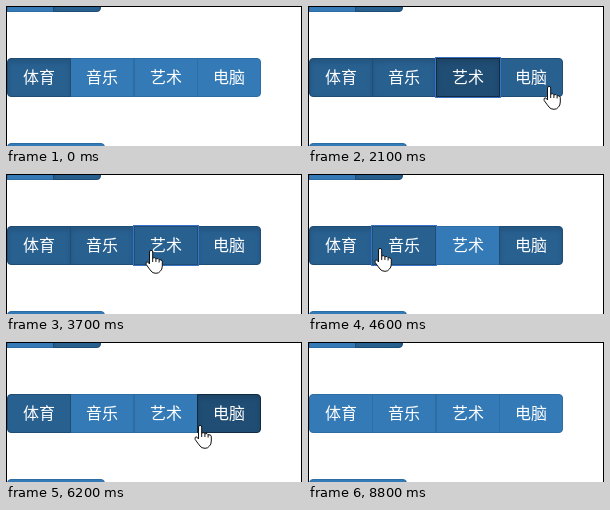
An HTML page for the animation above (9 s loop, 296 by 140 pixels).

```html
<!DOCTYPE html>
<html lang="zh-CN">
<head>
<meta charset="utf-8">
<style>
html, body { margin: 0; width: 296px; height: 140px; overflow: hidden; background: #fff; }
body { position: relative; }
body > * { position: absolute; box-sizing: border-box; }
.btn {
  top: 52px; width: 64px; height: 39px; line-height: 34px;
  background: #337ab7; border: 1px solid #2e6da4; color: #fff;
  font-family: "Noto Sans CJK SC Light", "Noto Sans CJK SC", "Noto Sans CJK", sans-serif;
  font-size: 16px; font-weight: 300; text-align: center; white-space: nowrap;
}
.first { border-radius: 4px 0 0 4px; }
.last { border-radius: 0 4px 4px 0; }
.hover, .focus, .active { background: #286090; border-color: #204d74; z-index: 1; }
.active { box-shadow: inset 0 3px 5px rgba(0, 0, 0, .125); }
.focus { z-index: 2; }
.active.hover, .active.focus { background: #204d74; border-color: #122b40; }
.focus:not(.first) { outline: 1px solid #3a72c6; }
#cursor { left: 0; top: 0; z-index: 3; overflow: visible; }
#cursor path { fill: #fff; stroke: #111; stroke-linejoin: round; }
#frame { inset: 0; z-index: 4; border: solid #000; border-width: 1px 1px 0; }
</style>
</head>
<body>
<div class="btn" style="left:1px;top:-33px;width:47px"></div>
<div class="btn active last" style="left:47px;top:-33px;width:48px"></div>
<div class="btn" style="left:1px;top:137px;width:98px;border-radius:4px"></div>
<svg id="cursor" width="18" height="24">
  <path id="arrow" d="M.5.5V16.5L4.3 13L6.8 18.6L9.3 17.5L6.8 12H12Z"/>
  <g id="hand" transform="translate(-1)">
    <path d="M-1.5 14V2a1.6 1.6 0 0 1 3.2 0V8q2.8-1 3.2.8q2.6-.9 3.2.9q3.2-.4 3.2 2V16q0 3.5-2 5.2Q8 23.3 5 23.3Q1.5 23.3 0 21Q-2 18.5-4.8 14.5Q-5.6 12.3-4 11.8Q-3 11.6-1.5 14Z"/>
    <path d="M1.7 8V12M4.9 8.8V12M8.1 9.7V12.5"/>
  </g>
</svg>
<div id="frame"></div>
<script>
const LOOP = 9000, STEP = 100, BLUR = 8800, MOVE = 900;
const LEFT = 1, PITCH = 63.5;

// arrival time, x, y of the pointer tip, button clicked on arrival
const stops = [
  [0, 310, 32], [1000, 108, 74], [1200, 114, 81, 1], [1300, 117, 84],
  [1800, 165, 86, 2], [2100, 242, 80], [2200, 242, 80, 3], [2800, 234, 114],
  [3600, 160, 80, 2], [3900, 118, 69], [4200, 118, 69, 1],
  [4900, 40, 78, 0], [5200, 49, 125], [6200, 195, 83], [6400, 216, 74, 3],
  [6700, 236, 150], [7200, 290, 134], [7300, 310, 150], [LOOP, 310, 150]
];
const $ = id => document.getElementById(id);

const options = ['体育', '音乐', '艺术', '电脑'].map((label, i) => {
  const el = document.createElement('div');
  el.className = 'btn ' + ['first', '', '', 'last'][i];
  el.style.left = Math.floor(LEFT + PITCH * i) + 'px';
  el.textContent = label;
  return document.body.appendChild(el);
});

// The pointer rests at a stop, then takes at most MOVE ms to reach the next.
function pointer(t) {
  const i = stops.findIndex(s => s[0] > t);
  const [t0, x0, y0] = stops[i - 1], [t1, x1, y1] = stops[i];
  const k = Math.max(0, 1 - (t1 - t) / Math.min(t1 - t0, MOVE));
  return [x0 + (x1 - x0) * k, y0 + (y1 - y0) * k].map(Math.round);
}

function draw(now) {
  const t = Math.floor(now % LOOP / STEP) * STEP;
  const [x, y] = pointer(t);
  const column = Math.floor((x - LEFT) / PITCH);
  const hover = y >= 52 && y < 91 && options[column] ? column : -1;
  const active = [true, false, false, false];
  let focus = -1;
  for (const [at, , , i] of stops) {
    if (at > t || i === undefined) continue;
    active[i] = !active[i];
    focus = i;
  }
  if (t >= BLUR) focus = -1;
  options.forEach((el, i) => {
    el.classList.toggle('active', active[i]);
    el.classList.toggle('focus', i === focus);
    el.classList.toggle('hover', i === hover);
  });
  $('cursor').style.transform = `translate(${x}px, ${y}px)`;
  $('hand').style.display = hover < 0 ? 'none' : '';
  $('arrow').style.display = hover < 0 ? '' : 'none';
}

const start = performance.now();
function tick() {
  draw(performance.now() - start);
  requestAnimationFrame(tick);
}
tick();
</script>
</body>
</html>
```
